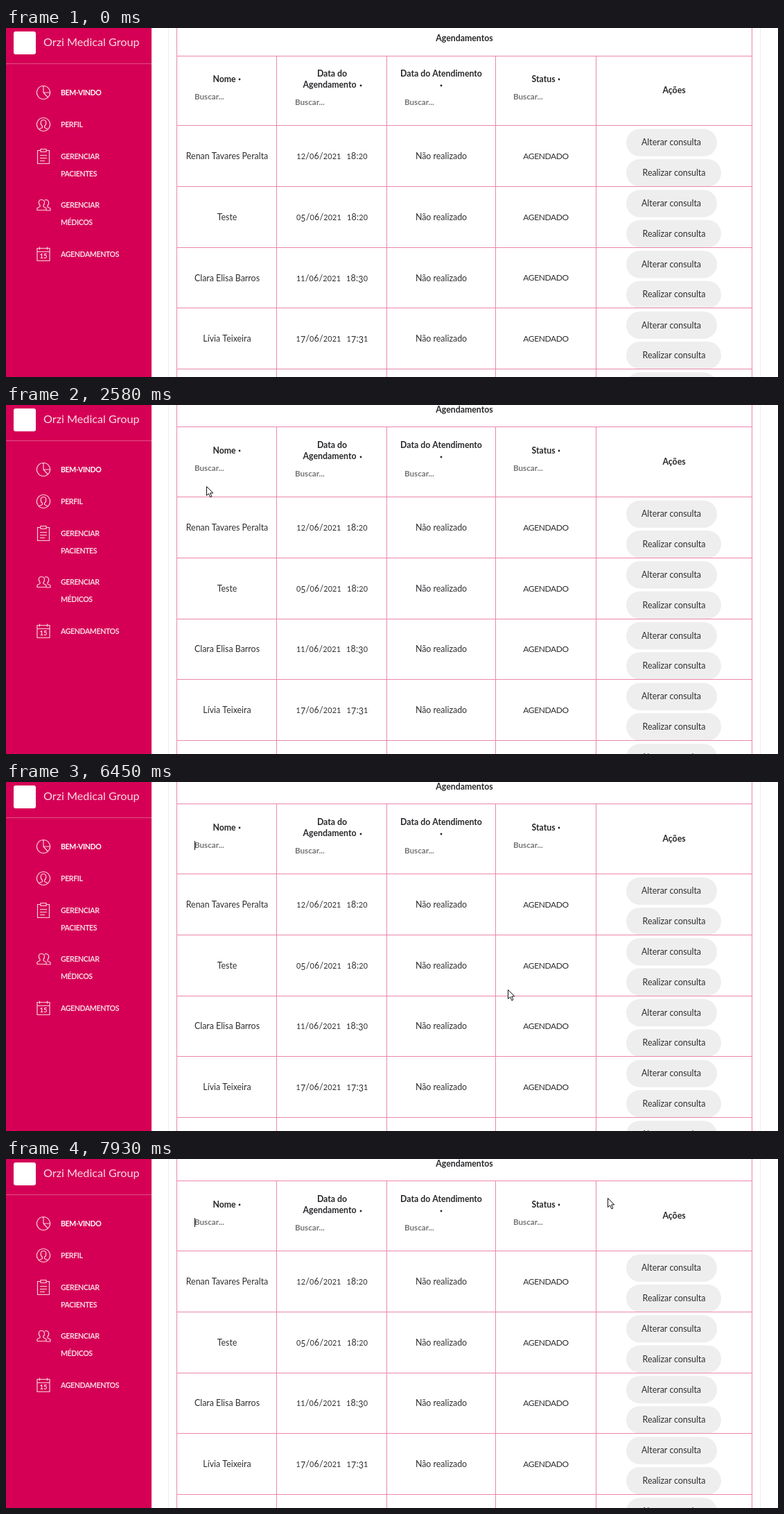
An HTML page with a canvas that plays this animation: 1114 by 503 pixels, repeating every 7990 ms.

```html
<!DOCTYPE html>
<html lang="pt">
<head>
<meta charset="utf-8">
<title>Agendamentos</title>
<style>
  html, body { margin: 0; width: 100%; height: 100%; overflow: hidden; background: #fff; }
  canvas { display: block; }
</style>
</head>
<body>
<canvas id="stage" width="1114" height="503"></canvas>
<script>
const ctx = document.getElementById('stage').getContext('2d');
const W = 1114, H = 503, LOOP = 7990;
const PINK = '#d50055', LINE = '#ec86ae', INK = '#2f2f33';
const COLS = [246, 390, 549, 706, 851, 1076];
const HEAD_Y = 39.55, HEAD_H = 100.65, ROW_H = 87.7;

const ROWS = [
  ['Renan Tavares Peralta', '12/06/2021', '18:20', 'AGENDADO'],
  ['Teste', '05/06/2021', '18:20', 'AGENDADO'],
  ['Clara Elisa Barros', '11/06/2021', '18:30', 'AGENDADO'],
  ['Lívia Teixeira', '17/06/2021', '17:31', 'AGENDADO'],
  ['Gustavo da Rocha', '14/06/2021', '14:24', 'AGENDADO'],
  ['Renan Tavares Peralta', '14/06/2021', '23:34', 'REALIZADO'],
  ['Ivan Peixoto de Alvarado', '01/06/2021', '00:20', 'AGENDADO'],
  ['Ivan Peixoto de Alvarado', '15/06/2021', '11:02', 'AGENDADO']
];

// Each key: time, then values.
const POINTER = [
  [80, 1097, 490], [200, 1090, 440], [340, 1068, 378], [440, 1062, 387],
  [690, 1062, 387], [900, 880, 345], [1160, 646, 279], [1460, 518, 215],
  [2150, 518, 215], [2350, 390, 160], [2580, 289, 117], [2780, 291, 95],
  [2810, 291, 94], [3040, 299, 95], [6100, 299, 95], [6280, 520, 210],
  [6450, 724, 299], [6560, 730, 299], [7400, 730, 299], [7680, 804, 119],
  [7770, 804, 119], [7930, 868, 56]
];
const SCROLL = [
  [1540, 0], [1720, -75], [1980, -75], [2180, 8.1], [4289, 8.1], [4290, -56],
  [5359, -56], [5360, 8.1], [6760, 8.1], [6910, 91], [7080, 174], [7240, 174], [7520, 8.1]
];
const TYPED = [[0, ''], [3880, 'P'], [4220, 'Pe'], [4250, 'Per'], [4440, 'Pera'], [4570, 'Peral'], [5360, '']];
const FILTER = [[0, ''], [3980, 'P'], [4290, 'Per'], [5360, '']];

function at(keys, t) {
  let i = 0;
  while (i < keys.length - 1 && keys[i + 1][0] <= t) i++;
  const a = keys[i], b = keys[i + 1];
  if (!b || t <= a[0]) return a.slice(1);
  const k = (t - a[0]) / (b[0] - a[0]);
  return a.slice(1).map((v, n) => v + (b[n + 1] - v) * k);
}

const step = (keys, t) => keys.filter(k => k[0] <= t).pop()[1];

function setFont(size, weight = 400, spacing = 0) {
  ctx.font = `${weight} ${size}px Lato, sans-serif`;
  ctx.letterSpacing = spacing + 'px';
}

function text(str, x, y, { size = 12.4, weight = 400, color = INK, align = 'center', spacing = 0 } = {}) {
  setFont(size, weight, spacing);
  ctx.fillStyle = color;
  ctx.textAlign = align;
  ctx.fillText(str, x, Math.round(y + size * 0.36));
}

function rect(x, y, w, h, color) {
  ctx.fillStyle = color;
  ctx.fillRect(x, y, w, h);
}

function pill(x, y, w, h, r, color) {
  ctx.fillStyle = color;
  ctx.beginPath();
  ctx.roundRect(x, y, w, h, r);
  ctx.fill();
}

// Old-style figures: 0-2 at x-height, 3-5, 7 and 9 below the baseline.
function figures(str, cx, y) {
  const glyphs = [...str].map(c => {
    const size = '012'.includes(c) ? 10.8 : 12.4;
    setFont(size);
    return { c, size, w: c === ' ' ? 8 : ctx.measureText(c).width + 0.2 };
  });
  let x = cx - glyphs.reduce((sum, g) => sum + g.w, 0) / 2;
  const base = Math.round(y + 4.4);
  ctx.fillStyle = INK;
  ctx.textAlign = 'left';
  for (const g of glyphs) {
    setFont(g.size);
    ctx.fillText(g.c, x, base + ('34579'.includes(g.c) ? 2 : 0));
    x += g.w;
  }
}

function stroke(path) {
  ctx.stroke(new Path2D(path));
}

function sidebar() {
  rect(0, 0, 210, H, PINK);
  rect(0, 51, 210, 1, '#e24d88');
  pill(11, 5, 32, 33, 3, '#fff');
  text('Orzi Medical Group', 54, 20, { size: 16.2, color: '#fbdbe7', align: 'left' });

  const items = [['BEM-VINDO', 93], ['PERFIL', 139], ['GERENCIAR', 185], ['PACIENTES', 210],
    ['GERENCIAR', 255], ['MÉDICOS', 280], ['AGENDAMENTOS', 326]];
  items.forEach(([label, y], i) => text(label, 79, y,
    { size: 10.6, weight: 700, color: i ? '#fad9e5' : '#fff', align: 'left', spacing: -0.4 }));

  ctx.lineWidth = 1.2;
  ctx.strokeStyle = '#f8cfde';
  stroke('M54 83.5a9.5 9.5 0 1 0 .01 0M54 84V93H63.500M54 93L60.500 100');
  stroke('M54 129.5a9.5 9.5 0 1 0 .01 0M54 132.5c-5 0-4.5 7-1.5 9v2l-5 2.5M54 132.5c5 0 4.5 7 1.5 9v2l5 2.5');
  stroke('M50 176.5h-4.5v19h17v-19H58M50 174.5h8v4h-8zM49 183.5h10M49 187.5h10M49 191.5h7');
  stroke('M51 247.5c-5 0-4 6-2 8v2l-4 2v3h13v-3l-4-2v-2c2-2 3-8-3-8M56 248c6-2 7 5 4 8v2l4 2v3h-6');
  stroke('M45 317.5h18v18H45zM45 322.5h18M48.5 315.5v4M59.5 315.5v4');
  text('15', 54, 328.5, { size: 9.5, weight: 700, color: '#fad9e5' });
}

function searchBox(x, y) {
  text('Buscar...', x, y, { size: 11.6, weight: 700, color: '#757575', align: 'left' });
}

function header(y) {
  const bold = { size: 12.3, weight: 700, color: '#28282c' };
  const label = (str, x, dy) => text(str, x, y + dy, bold);
  const dot = (x, dy) => {
    ctx.fillStyle = bold.color;
    ctx.beginPath();
    ctx.arc(x, y + dy, 1.4, 0, Math.PI * 2);
    ctx.fill();
  };
  label('Agendamentos', 661.5, -25);
  label('Nome', 315, 34);
  dot(337, 34);
  label('Data do', 470.5, 26);
  label('Agendamento', 467, 42);
  dot(512, 43);
  label('Data do Atendimento', 628, 26);
  dot(628, 43);
  label('Status', 775.5, 34);
  dot(798, 34);
  label('Ações', 964, 50);
  searchBox(417, y + 67);
  searchBox(575, y + 67);
  searchBox(732, y + 59);
}

function nameField(t, y) {
  const typed = step(TYPED, t);
  const selected = t >= 5130 && t < 5360;
  if (!typed) searchBox(272, y);
  setFont(11.6, 700);
  const w = ctx.measureText(typed).width;
  if (selected) rect(272, y - 8, w, 17, '#3390ff');
  text(typed, 272, y, { size: 11.6, weight: 700, color: selected ? '#fff' : INK, align: 'left' });

  const blink = t >= 5360 ? Math.floor((t - 5360) / 525) % 2 === 0 : t < 3470 || t >= 3880;
  if (t >= 2940 && blink && !selected) rect(Math.round(272 + w), y - 6, 1, 13, '#111');
}

function row([name, date, time, status], y) {
  const mid = y + 44.5;
  text(name, 319, mid);
  figures(date + ' ' + time, 470.5, mid);
  text('Não realizado', 628, mid);
  text(status, 779, mid, { size: 12, spacing: -0.4 });
  pill(895, y + 5.3, 131, 39.5, 19.7, '#eee');
  text('Alterar consulta', 960, y + 24.8);
  pill(895, y + 48.8, 137, 39.5, 19.7, '#eee');
  text('Realizar consulta', 964, y + 68.3);
}

function table(t) {
  const head = HEAD_Y - at(SCROLL, t)[0];
  const body = head + HEAD_H;
  const rows = ROWS.filter(r => r[0].includes(step(FILTER, t)));
  const lineY = i => Math.round(body + i * ROW_H);
  const top = Math.round(head), first = top - 50;
  const bottom = lineY(rows.length) + 1;

  const cardTop = Math.max(-5, first - 12);
  ctx.lineWidth = 1;
  ctx.strokeStyle = '#eee';
  ctx.strokeRect(234.5, cardTop + 0.5, 854, H + 20);

  const textTop = lineY(0) - 100;
  header(textTop);
  nameField(t, textTop + 59);
  rows.forEach((r, i) => row(r, body + i * ROW_H));

  const width = COLS[5] - COLS[0] + 1;
  rect(COLS[0], first, width, 1, LINE);
  rect(COLS[0], top, width, 1, LINE);
  for (let i = 0; i <= rows.length; i++) rect(COLS[0], lineY(i), width, 1, LINE);
  rect(COLS[0], bottom, width, 2, '#e97aa6');
  COLS.forEach((x, i) => {
    const y = i % 5 ? top : first;
    rect(x, y, 1, bottom - y, LINE);
  });
}

function pointer(t) {
  if (t < 80) return;
  const [x, y] = at(POINTER, t).map(Math.round);
  ctx.save();
  ctx.translate(x + 0.5, y + 0.5);
  const arrow = new Path2D('M0 0V13L3 10.2L5.3 15.3L7.4 14.4L5.2 9.4H9.3Z');
  ctx.fillStyle = '#fff';
  ctx.fill(arrow);
  ctx.lineWidth = 1;
  ctx.strokeStyle = '#111';
  ctx.stroke(arrow);
  ctx.restore();
}

let start;
function frame(now) {
  start ??= now;
  const t = (now - start) % LOOP;
  rect(0, 0, W, H, '#fff');
  table(t);
  sidebar();
  pointer(t);
  requestAnimationFrame(frame);
}
requestAnimationFrame(frame);
</script>
</body>
</html>
```
